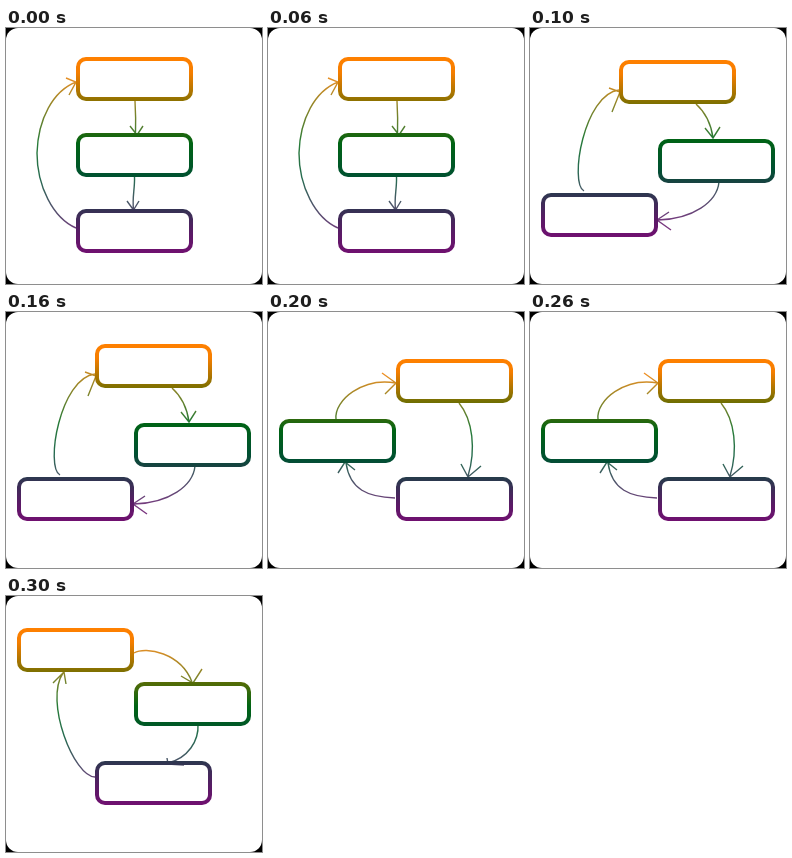
An HTML page with a canvas that plays this animation: 256x256 px, repeating every 0.4 s.

```html
<!DOCTYPE html>
<html>
<head>
<meta charset="utf-8">
<title>Cycle of three boxes</title>
<style>
  html, body { margin: 0; height: 100%; overflow: hidden; background: #000; }
  canvas { display: block; width: 100vmin; height: 100vmin; }
</style>
</head>
<body>
<canvas width="256" height="256"></canvas>
<script>
const ctx = document.querySelector('canvas').getContext('2d');
const STEP = 100;
const BOX = { width: 117, height: 44, line: 4, radius: 8 };
const COLOURS = [
  [0, '#ff8000'], [0.08, '#f57e00'], [0.24, '#827000'], [0.44, '#006414'],
  [0.62, '#005032'], [0.76, '#2f3650'], [0.9, '#5a1a66'], [1, '#701070']
];

// Each pose: top-left corners of the boxes, then the arrows (shaft and head).
const poses = [
  {
    boxes: [[70, 29], [70, 105], [70, 181]],
    arrows: [
      'M129 73 Q130 90 129.5 106 M124 98 L131 107 L137 98',
      'M128.5 149 C129 160 126 170 127.5 181 M121 173 L127.5 182 L133 173',
      'M70 200 C47 190 31 158 31 125 C32 91 47 63 70 54 M60 50 L70 54 L63 67'
    ]
  },
  {
    boxes: [[89, 32], [128, 111], [11, 165]],
    arrows: [
      'M166 76 C175 84 181 95 183 110 M175 100 L183 110 L190 99',
      'M189 154 C187 174 163 191 128 192 M139 184 L127 192 L141 202',
      'M54 163 C39 155 54 66 89 62 M79 60 L90 64 L82 84'
    ]
  },
  {
    boxes: [[128, 47], [11, 107], [128, 165]],
    arrows: [
      'M191 91 C205 108 208 138 200 164 M193 152 L200 165 L213 154',
      'M127 186 C100 185 82 178 78 151 M70 161 L77 150 L87 158',
      'M68 107 C66 88 95 65 128 71 M114 61 L128 71 L117 82'
    ]
  },
  {
    boxes: [[11, 32], [128, 86], [89, 165]],
    arrows: [
      'M128 57 C140 50 175 57 186 86 M175 80 L187 87 L196 73',
      'M192 128 C193 145 182 162 162 167 M161 162 L162 168 L178 169',
      'M89 181 C68 181 38 105 57 77 M47 87 L58 76 L60 88'
    ]
  }
];

function verticalGradient(boxes) {
  const top = boxes[0][1];
  const bottom = boxes[2][1] + BOX.height;
  const gradient = ctx.createLinearGradient(0, top, 0, bottom);
  COLOURS.forEach(([at, colour]) => gradient.addColorStop(at, colour));
  return gradient;
}

function roundRect(x, y, width, height, radius) {
  ctx.beginPath();
  ctx.roundRect(x, y, width, height, radius);
}

function draw({ boxes, arrows }) {
  ctx.fillStyle = '#000';
  ctx.fillRect(0, 0, 256, 256);
  ctx.fillStyle = '#fff';
  roundRect(0, 0, 256, 256, 12);
  ctx.fill();

  ctx.strokeStyle = verticalGradient(boxes);
  ctx.lineWidth = 1.4;
  ctx.globalAlpha = 0.85;
  arrows.forEach(path => ctx.stroke(new Path2D(path)));

  ctx.globalAlpha = 1;
  ctx.lineWidth = BOX.line;
  const inset = BOX.line / 2;
  for (const [x, y] of boxes) {
    roundRect(x + inset, y + inset, BOX.width - BOX.line, BOX.height - BOX.line, BOX.radius);
    ctx.stroke();
  }
}

const start = performance.now();
function frame() {
  const elapsed = performance.now() - start;
  draw(poses[Math.floor(elapsed / STEP) % poses.length]);
  requestAnimationFrame(frame);
}
frame();
</script>
</body>
</html>
```
